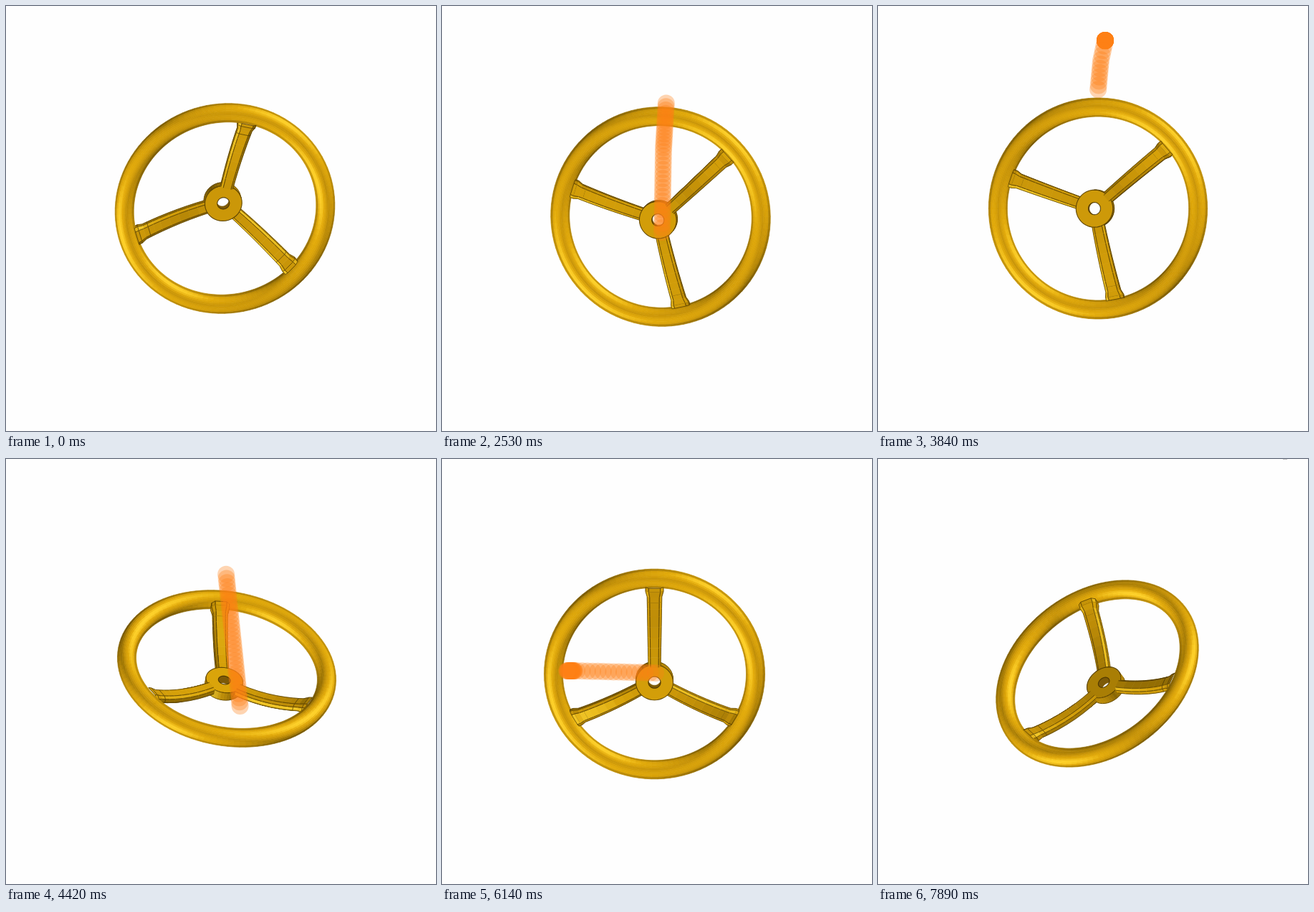
An HTML page with a canvas for the animation above (8040 ms loop, 600 by 592 pixels).

```html
<!DOCTYPE html>
<html lang="en">
<head>
<meta charset="utf-8">
<title>Handwheel orbit</title>
<style>
  html, body { margin: 0; width: 100%; height: 100%; overflow: hidden; background: #fefefe; }
  canvas { display: block; }
</style>
</head>
<body>
<canvas id="stage" width="600" height="592"></canvas>
<script>
const ctx = document.getElementById('stage').getContext('2d');
const LOOP = 8040, TRAIL = 460, STEP = 14;
const RING = 141, TUBE = 13, HUB = 26, BORE = 8.5, FRONT = -22, BACK = -36;
const INK = 'rgba(62,44,0,.75)';

// time, pitch, yaw, roll (degrees), ring centre x, y
const POSES = [
  [1850, 19, 6, 12, 305.5, 282],
  [2030, -68, 0, 12, 305, 287],
  [2530, -172.5, -6, 12, 305, 293.5],
  [2900, -203, -8, 12, 306, 288],
  [3300, -213, -8, 12, 307, 283],
  [3680, -213, -8, 11.5, 307, 282],
  [3840, -180, -8, 11, 307, 282],
  [4420, -47, 12.4, 5, 308, 292],
  [4700, -19, 2, 0, 304, 299],
  [5350, -19, 0, 0, 304, 299],
  [5480, -19, -41, 0, 308, 299],
  [5660, -19, -100, 0, 308, 299],
  [5900, -19, -168, 0, 299, 299.5],
  [6140, -19, -180, 0, 296.5, 299.5],
  [6250, -19, -180, 0, 296.5, 299.5],
  [6600, -22, -72, -8, 307, 299],
  [7000, -31, -37, -20, 307, 299],
  [7450, -33, -32, -23, 306, 299],
  [7890, -33.8, -30, -24, 306, 299]
];

// time, pointer x, y
const POINTER = [
  [1710, 572, 0], [1850, 315, 471], [2070, 307, 316], [2330, 309, 200],
  [2530, 313, 132], [2900, 316, 66], [3300, 317, 48], [3680, 317, 48],
  [3740, 311, 76], [3840, 307, 118], [3960, 307, 160], [4420, 327, 348],
  [4600, 330, 412], [4960, 440, 360], [5010, 514, 306], [5350, 515, 306],
  [5390, 490, 297], [5480, 412, 298], [5680, 300, 298], [5900, 185, 295],
  [6140, 174, 295], [6250, 174, 295], [6600, 420, 297], [6950, 558, -14]
];

function sample(keys, t) {
  if (t <= keys[0][0]) return keys[0].slice(1);
  for (let i = 1; i < keys.length; i++) {
    const a = keys[i - 1], b = keys[i];
    if (t <= b[0]) {
      const u = (t - a[0]) / (b[0] - a[0]);
      return a.slice(1).map((v, j) => v + (b[j + 1] - v) * u);
    }
  }
  return keys[keys.length - 1].slice(1);
}

const rad = d => d * Math.PI / 180;
const sub = (a, b) => a.map((v, i) => v - b[i]);
const dot = (a, b) => a[0] * b[0] + a[1] * b[1] + a[2] * b[2];
const cross = (a, b) => [a[1] * b[2] - a[2] * b[1], a[2] * b[0] - a[0] * b[2], a[0] * b[1] - a[1] * b[0]];
const unit = a => { const l = Math.hypot(...a) || 1; return a.map(v => v / l); };
const mean = ps => [0, 1, 2].map(i => ps.reduce((s, p) => s + p[i], 0) / ps.length);

const LIGHTS = [[-.5, .45, .74], [.5, -.45, .74]].map(unit);
const RAMP = [[0, 105, 76, 0], [.5, 160, 119, 4], [.74, 200, 148, 8], [.92, 226, 170, 10], [1, 255, 210, 42]];

function gold(n, gain = 1) {
  const d = Math.max(0, ...LIGHTS.map(l => dot(l, n)));
  return `rgb(${sample(RAMP, d).map(v => Math.round(v * gain))})`;
}

let turn, items;

function setTurn(pitch, yaw) {
  const ca = Math.cos(rad(pitch)), sa = Math.sin(rad(pitch));
  const cb = Math.cos(rad(yaw)), sb = Math.sin(rad(yaw));
  turn = ([x, y, z]) => {
    const v = y * ca + z * sa, w = z * ca - y * sa;
    return [x * cb + w * sb, v, w * cb - x * sb];
  };
}

const add = (z, draw) => items.push({ z, draw });

function path(ps) {
  ctx.beginPath();
  ps.forEach(p => ctx.lineTo(p[0], p[1]));
  ctx.closePath();
}

function fill(ps, color) {
  path(ps);
  ctx.fillStyle = ctx.strokeStyle = color;
  ctx.lineWidth = .7;
  ctx.fill();
  ctx.stroke();
}

function line(a, b, width = .9) {
  ctx.beginPath();
  ctx.moveTo(a[0], a[1]);
  ctx.lineTo(b[0], b[1]);
  ctx.strokeStyle = INK;
  ctx.lineWidth = width;
  ctx.stroke();
}

// Adds a face if it looks at the viewer; edges lists the point pairs to ink.
function face(ps, inside, edges, gain) {
  const mid = mean(ps);
  let n = unit(cross(sub(ps[1], ps[0]), sub(ps[2], ps[0])));
  if (dot(n, sub(mid, inside)) < 0) n = n.map(v => -v);
  if (n[2] <= 0) return;
  add(mid[2], () => {
    fill(ps, gold(n, gain));
    edges.forEach(([i, j]) => line(ps[i], ps[j]));
  });
}

function circle(r, z, count = 40) {
  return Array.from({ length: count }, (_, i) => {
    const a = i / count * 2 * Math.PI;
    return turn([r * Math.cos(a), r * Math.sin(a), z]);
  });
}

function addRing() {
  const count = 110, strips = 11;
  const nodes = Array.from({ length: count }, (_, i) => {
    const a = i / count * 2 * Math.PI;
    const c = turn([RING * Math.cos(a), RING * Math.sin(a), 0]);
    const t = turn([-Math.sin(a), Math.cos(a), 0]);
    const len = Math.hypot(t[0], t[1]) || 1e-4;
    const w = [-t[1] / len, t[0] / len, 0];
    return { c, w, v: [-t[2] * w[1], t[2] * w[0], len] };
  });
  const edge = (n, s) => [n.c[0] + n.w[0] * s * TUBE, n.c[1] + n.w[1] * s * TUBE];
  nodes.forEach((a, i) => {
    const b = nodes[(i + 1) % count];
    add((a.c[2] + b.c[2]) / 2, () => {
      for (let k = 0; k < strips; k++) {
        const s0 = k / strips * 2 - 1, s1 = (k + 1) / strips * 2 - 1, s = (s0 + s1) / 2;
        const q = Math.sqrt(1 - s * s);
        const n = a.w.map((w, j) => w * s + a.v[j] * q);
        fill([edge(a, s0), edge(b, s0), edge(b, s1), edge(a, s1)], gold(n, Math.abs(s) > .9 ? .88 : 1));
      }
    });
  });
}

function addSpoke(bearing) {
  const s = Math.sin(rad(bearing)), c = Math.cos(rad(bearing));
  const radii = [22, 36, 50, 64, 78, 92, 102, 110, 117, 124, 129];
  const sections = radii.map((r, i) => {
    const u = (r - 22) / 107, z = -29 * (1 - u * u);
    const w = r >= 124 ? 12.5 : 8.5 + 2 * u, t = r >= 124 ? 8 : 6.5;
    const half = [[-w, -.5 * t], [-.65 * w, -t], [.65 * w, -t], [w, -.5 * t]];
    const shape = [...half, ...half.map(([x, y]) => [-x, -y])];
    const at = ([x, y]) => turn([s * r + c * x, -c * r + s * x, z + y]);
    return { r, mid: at([0, 0]), ps: shape.map(at) };
  });
  for (let i = 1; i < sections.length; i++) {
    const a = sections[i - 1], b = sections[i], inside = mean([a.mid, b.mid]);
    for (let k = 0; k < 8; k++) {
      const m = (k + 1) % 8, edges = [[0, 1], [3, 2]];
      if (a.r === 110 || a.r === 124) edges.push([0, 3]);
      if (b.r === 129) edges.push([1, 2]);
      face([a.ps[k], b.ps[k], b.ps[m], a.ps[m]], inside, edges, .95);
    }
  }
}

function addHub() {
  const f = circle(HUB, FRONT), b = circle(HUB, BACK);
  const core = turn([0, 0, (FRONT + BACK) / 2]);
  f.forEach((p, i) => {
    const j = (i + 1) % f.length;
    face([p, b[i], b[j], f[j]], core, [[0, 3], [1, 2]], .85);
  });
  const n = turn([0, 0, 1]), seen = n[2] > 0;
  const near = seen ? FRONT : BACK, far = seen ? BACK : FRONT;
  const rim = seen ? f : b;
  add(turn([0, 0, near])[2] + 2, () => {
    fill(rim, gold(seen ? n : n.map(v => -v), .98));
    path(rim);
    ctx.strokeStyle = INK;
    ctx.lineWidth = 1.1;
    ctx.stroke();
    const bore = circle(BORE, near);
    ctx.save();
    fill(bore, '#7d5a08');
    path(bore);
    ctx.clip();
    fill(circle(BORE, far), '#fefefe');
    ctx.restore();
    path(bore);
    ctx.strokeStyle = INK;
    ctx.stroke();
  });
}

function drawTrail(t) {
  ctx.fillStyle = 'rgba(255,126,20,.33)';
  const end = POINTER[POINTER.length - 1][0];
  const first = Math.max(POINTER[0][0], t - TRAIL);
  for (let k = Math.ceil(first / STEP) * STEP; k <= Math.min(t, end); k += STEP) {
    const [x, y] = sample(POINTER, k);
    ctx.beginPath();
    ctx.arc(x, y, 12, 0, 7);
    ctx.fill();
  }
  if (t > end) {
    ctx.fillStyle = '#c4c4c4';
    ctx.fillRect(565, 0, 6, 1);
  }
}

function render(t) {
  const [pitch, yaw, roll, x, y] = sample(POSES, t);
  setTurn(pitch, yaw);
  items = [];
  addRing();
  [0, 120, 240].forEach(a => addSpoke(a + roll));
  addHub();
  items.sort((a, b) => a.z - b.z);

  ctx.fillStyle = '#fefefe';
  ctx.fillRect(0, 0, 600, 592);
  ctx.save();
  ctx.translate(x, y);
  items.forEach(item => item.draw());
  ctx.restore();
  drawTrail(t);
}

const start = performance.now();
function tick() {
  render((performance.now() - start) % LOOP);
  requestAnimationFrame(tick);
}
tick();
</script>
</body>
</html>
```
